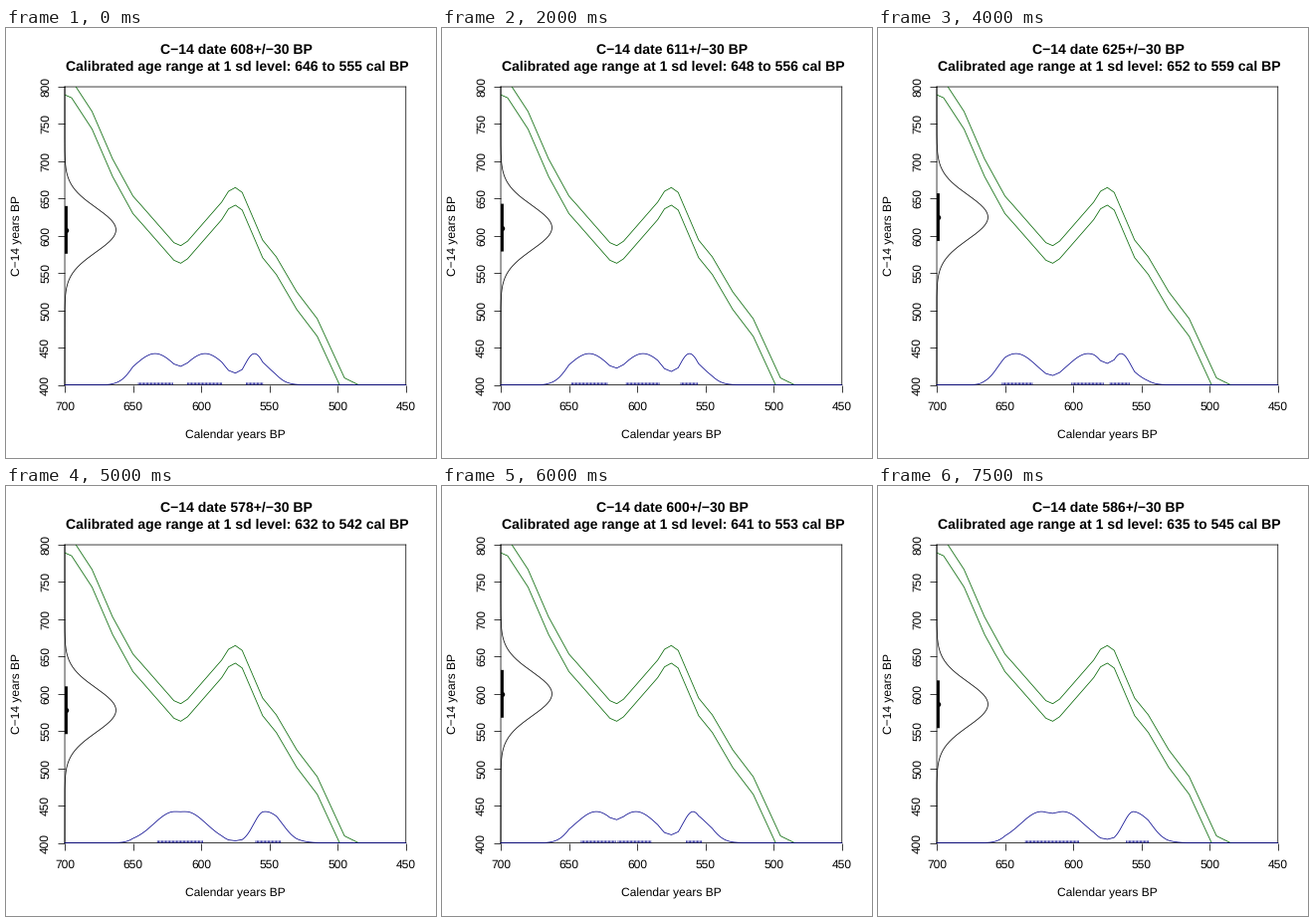
A matplotlib script for the animation above (8000 ms loop, 432x432 px).

```python
import numpy as np
import matplotlib.pyplot as plt
from matplotlib.animation import FuncAnimation

plt.rcParams.update({
    "font.family": "Liberation Sans",
    "text.hinting": "none",
    "path.snap": False,
})

SIZE = 432
LEFT, BOTTOM, WIDTH, HEIGHT = 59.04, 73.44, 342.72, 299.52
THIN = 0.75
GREEN, BLUE = "#006400", "#00008b"
SD = 30
CURVE_SD = 11.8
DATES = [608, 602, 631, 589, 611, 598, 570, 604,
         625, 590, 578, 551, 600, 593, 608, 586]

# Bends of the calibration curve: calendar year, C-14 age
BENDS = [(480, 384), (495, 397.5), (515, 477), (530, 513), (545, 560),
         (555, 582.5), (570, 646.5), (575, 653), (580, 648), (585, 633.5),
         (610, 581), (615, 575), (620, 579), (640, 621), (650, 641.5),
         (665, 691.5), (680, 755), (695, 797), (700, 801)]

YEARS = np.arange(450, 701)
AGES = np.arange(400, 801, 2)
MEAN = np.interp(YEARS, *zip(*BENDS))


def calibrate(date):
    """Return the calendar density scaled to 1 and the 68.3% densest years."""
    p = np.exp(-0.5 * ((date - MEAN) / np.hypot(SD, CURVE_SD)) ** 2)
    order = np.argsort(-p)
    share = np.cumsum(p[order]) / p.sum()
    return p / p.max(), YEARS[order[share <= 0.683]]


fig = plt.figure(figsize=(SIZE / 72, SIZE / 72), dpi=72, facecolor="white")
ax = fig.add_axes([LEFT / SIZE, BOTTOM / SIZE, WIDTH / SIZE, HEIGHT / SIZE])
ax.set(xlim=(700, 450), ylim=(400, 800),
       xticks=range(450, 701, 50), yticks=range(400, 801, 50))
ax.tick_params(length=7.2, width=THIN, labelbottom=False, labelleft=False)
for spine in ax.spines.values():
    spine.set_linewidth(THIN)


def label(x, y, text="", size=12, **kw):
    """Centre text on x with its baseline at y, in pixels from the top left."""
    return fig.text(x / SIZE, 1 - y / SIZE, text, fontsize=size, ha="center",
                    va="baseline", rotation_mode="anchor", **kw)


def line(x=(), y=(), color="black", width=THIN, **kw):
    return ax.plot(x, y, color=color, lw=width, zorder=3, **kw)[0]


for year in range(450, 701, 50):
    label(LEFT + (700 - year) / 250 * WIDTH, 384, str(year))
for age in range(400, 801, 50):
    y = SIZE - BOTTOM - (age - 400) / 400 * HEIGHT
    label(43, y, str(age), rotation=90)
label(230.4, 413, "Calendar years BP")
label(14, 208, "C\u221214 years BP", rotation=90)

title = label(231, 26, size=14, weight="bold")
subtitle = label(232, 43, size=14, weight="bold")

for side in (-1, 1):
    line(YEARS, MEAN + side * CURVE_SD, GREEN)
bell = line(clip_on=False)
bar = line(width=3)
dot = ax.plot([], [], "o", color="black", ms=5.5, mew=0, zorder=4)[0]
density = line(color=BLUE, clip_on=False)
rug = ax.vlines([700], 400, 400, color=BLUE, lw=THIN, zorder=3)


def update(i):
    date = DATES[i]
    p, dense = calibrate(date)
    title.set_text(f"C\u221214 date {date}+/\u2212{SD} BP")
    subtitle.set_text("Calibrated age range at 1 sd level: "
                      f"{dense.max()} to {dense.min()} cal BP")

    bell.set_data(700 - 37.5 * np.exp(-0.5 * ((AGES - date) / SD) ** 2), AGES)
    bar.set_data([699, 699], [date - SD, date + SD])
    dot.set_data([699], [date])
    density.set_data(YEARS, 400 + 42 * p)
    rug.set_segments([[(x, 400), (x, 403)] for x in dense])
    return title, subtitle, bell, bar, dot, density, rug


anim = FuncAnimation(fig, update, frames=len(DATES), interval=500,
                     repeat=True, repeat_delay=0, blit=False)
plt.show()
```
